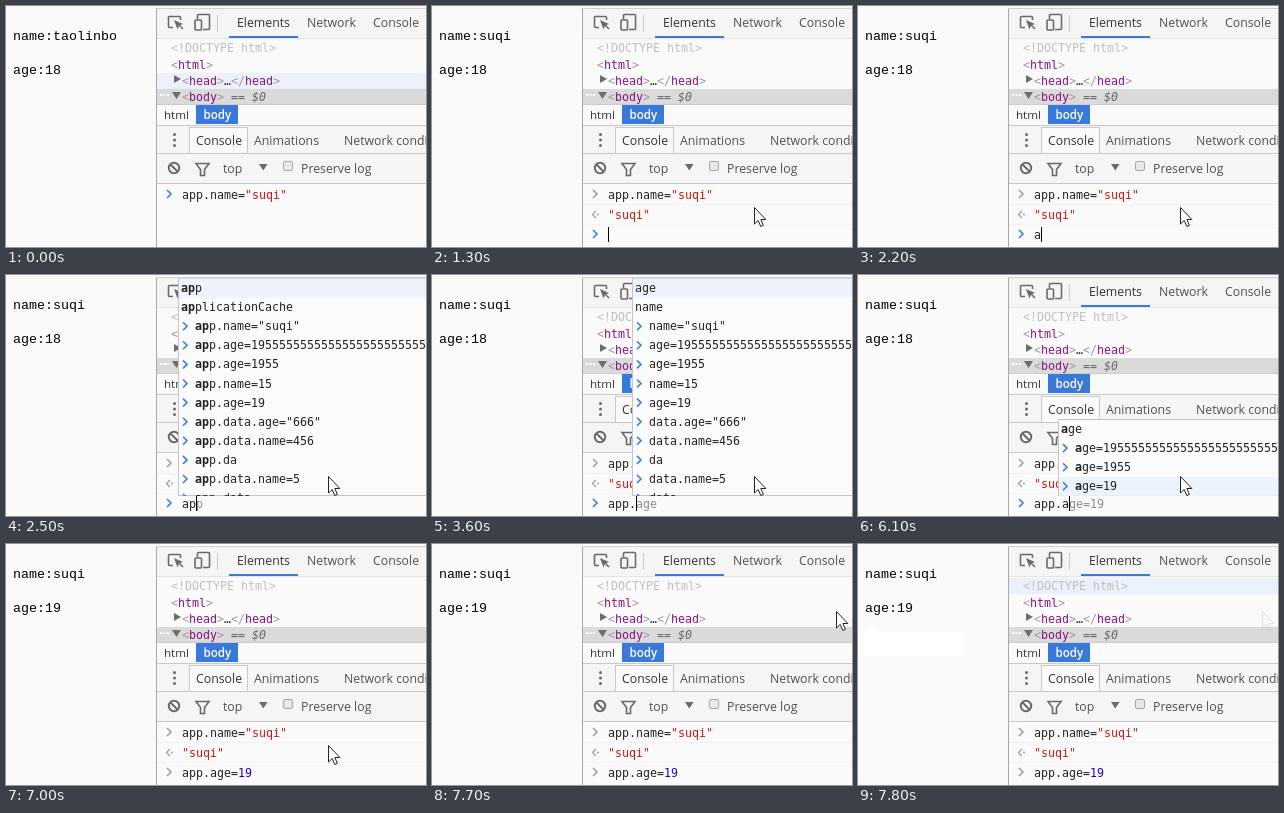
An HTML page for the animation above (8.5 s loop, 420 by 241 pixels).

```html
<!DOCTYPE html>
<html lang="en">
<head>
<meta charset="utf-8">
<title>Console data binding</title>
<style>
  html, body { margin: 0; width: 100%; height: 100%; overflow: hidden; background: #fafafa; }
  svg { display: block; width: 420px; height: 241px; }
  text { white-space: pre; }
  .page { font: 13.33px "Liberation Mono", monospace; fill: #000; }
  .ui { font: 500 12.3px "Open Sans", sans-serif; fill: #505050; }
  .crumb { font: 600 11.6px "Open Sans", sans-serif; fill: #333; }
  .code { font: 11.63px "DejaVu Sans Mono", monospace; fill: #222; }
  .dark { fill: #333; }
  .tag { fill: #881280; }
  .dim { fill: #a894a6; }
  .str { fill: #c41a16; }
  .num { fill: #1c00cf; }
  .ghost { fill: #8c8c8c; }
  .bold { font-weight: bold; }
  .icon { fill: none; stroke: #6a6a6a; stroke-width: 1.6; }
  .solid { fill: #6a6a6a; }
</style>
</head>
<body>
<svg viewBox="0 0 420 241">
  <defs>
    <clipPath id="clip"><rect id="clipBox" x="150" width="270"/></clipPath>
  </defs>
  <rect width="420" height="241" fill="#fafafa"/>
  <g id="tip" fill="#fff"><path d="M5 88l9-9 9 9z"/><rect y="88" width="105" height="24"/></g>
  <text id="name" class="page" x="7" y="34"></text>
  <text id="age" class="page" x="7" y="68"></text>

  <rect x="151" y="3" width="269" height="29" fill="#f5f5f5"/>
  <path d="M150.5 2V241" stroke="#a8a8a8"/>
  <path d="M150 2.5H420" stroke="#d0d0d0"/>
  <path d="M151 32.5H420" stroke="#e4e4e4"/>
  <g class="icon">
    <path d="M167 21.5h-3.5q-1 0-1-1v-9q0-1 1-1h10q1 0 1 1V14"/>
    <path d="M168 14l9 4-4 1.5-1.5 4z" class="solid" stroke="none"/>
    <path d="M173 19l4 4"/>
    <path d="M191.5 13V9.5q0-1 1-1h10q1 0 1 1v13q0 1-1 1H197"/>
    <rect x="189" y="14" width="6.5" height="10" rx="1"/>
  </g>
  <path d="M211.5 9V26" stroke="#ccc"/>
  <g class="ui">
    <text x="231" y="21" class="dark">Elements</text>
    <text x="301" y="21">Network</text>
    <text x="367" y="21">Console</text>
  </g>
  <rect x="223" y="30" width="69" height="2" fill="#3879d9"/>

  <rect id="hover" x="151" width="269" height="16" fill="#ebf1fb"/>
  <rect x="151" y="83" width="269" height="15.5" fill="#dadada"/>
  <g class="code">
    <text x="165" y="46" fill="#c0c0c0" style="fill:#c0c0c0">&lt;!DOCTYPE html&gt;</text>
    <text x="165" y="63" class="dim">&lt;<tspan class="tag">html</tspan>&gt;</text>
    <text x="176" y="79" class="dim">&lt;<tspan class="tag">head</tspan>&gt;<tspan class="dark">…</tspan>&lt;/<tspan class="tag">head</tspan>&gt;</text>
    <text x="176" y="95" class="dim">&lt;<tspan class="tag">body</tspan>&gt;<tspan fill="#666" font-style="italic"> == $0</tspan></text>
  </g>
  <path d="M168 69v8l7-4zM166 86h9l-4.5 7z" fill="#6e6e6e"/>
  <path d="M154 89h2m1.5 0h2m1.5 0h2" stroke="#fff" stroke-width="2"/>

  <path d="M151 98.5H420" stroke="#ccc"/>
  <rect x="190" y="99" width="42" height="19" fill="#3879d9"/>
  <text class="crumb" x="158" y="113" style="font-weight:500">html</text>
  <text class="crumb" x="197.5" y="113" style="fill:#fff">body</text>

  <rect x="151" y="119" width="269" height="59" fill="#f5f5f5"/>
  <path d="M151 119.5H420M151 147.5H420M151 177.5H420" stroke="#c8c8c8"/>
  <rect x="183.5" y="121.5" width="58" height="26" fill="#fafafa" stroke="#c8c8c8"/>
  <g class="solid">
    <circle cx="168.5" cy="128.5" r="1.5"/><circle cx="168.5" cy="134" r="1.5"/><circle cx="168.5" cy="139.5" r="1.5"/>
  </g>
  <g class="ui">
    <text x="190" y="139" class="dark">Console</text>
    <text x="248" y="139">Animations</text>
    <text x="338" y="139">Network conditions</text>
    <text x="217" y="167">top</text>
    <text x="295" y="167">Preserve log</text>
  </g>
  <g class="icon">
    <g stroke-width="2"><circle cx="168" cy="162" r="5.2"/><path d="M164.5 158.5l7 7"/></g>
    <path d="M190 157.5h13l-4.5 6v6h-4v-6z"/>
    <path d="M253 158h8.5l-4.200 6.500z" class="solid" stroke="none"/>
    <rect x="277.5" y="155.5" width="9" height="9" rx="1.500" style="fill:#e8e8e8;stroke:#a8a8a8;stroke-width:1"/>
  </g>

  <g id="log" class="code"></g>
  <g id="popup" class="code"></g>
  <path id="mouse" d="M.5 .5v16.500l3.700-3.500 2.600 6 2.600-1.100-2.600-5.900h5z" fill="#fff" stroke="#222"/>
</svg>
<script>
const $ = id => document.getElementById(id);
const LOOP = 8500, CHAR = 7, ROW = 19.1, BLUE = '#3b7bea', GREY = '#a0a0a0';
const past = ['name="suqi"', 'age=195' + '5'.repeat(28), 'age=1955', 'name=15', 'age=19',
  'data.age="666"', 'data.name=456', 'da', 'data.name=5', 'data'];

const lists = {
  app: { x: 172, y: 3, items: ['app', 'applicationCache'], past: past.map(p => 'app.' + p) },
  member: { x: 200, y: 3, items: ['age', 'name'], past },
  age: { x: 200, y: 144, items: ['age'], past: [past[1], past[2], past[4]] }
};

// pop: open list, sel: its marked row, pre: bold prefix length
const steps = [
  [0, { name: 'taolinbo', age: 18, done: false, input: 'app.name="suqi"', ghost: '', caret: 0,
        pop: '', sel: 0, pre: 0, hover: 67, tip: 0 }],
  [200, { hover: 0 }],
  [500, { caret: 1 }],
  [1000, { caret: 0 }],
  [1200, { name: 'suqi', done: true, input: '' }],
  [1300, { caret: 1 }],
  [1700, { caret: 0 }],
  [2200, { input: 'a', caret: 1 }],
  [2300, { ghost: 'pp', pop: 'app', pre: 1 }],
  [2500, { input: 'ap', ghost: 'p', pre: 2 }],
  [2600, { input: 'app', ghost: '', pre: 3 }],
  [3100, { caret: 0 }],
  [3500, { input: 'app.', pop: '', pre: 0, caret: 1 }],
  [3600, { ghost: 'age', pop: 'member' }],
  [4000, { caret: 0 }],
  [4200, { input: 'app.a', ghost: 'ge', pop: 'age', pre: 1, caret: 1 }],
  [4600, { caret: 0 }],
  [5100, { caret: 1 }],
  [5300, { sel: 1, ghost: past[1].slice(1) }],
  [5400, { sel: 2, ghost: 'ge=1955' }],
  [5600, { caret: 0 }],
  [5800, { sel: 3, ghost: 'ge=19' }],
  [6100, { caret: 1 }],
  [6300, { input: 'app.age=19', ghost: '', pop: '' }],
  [6800, { caret: 0 }],
  [7000, { age: 19, sent: true }],
  [7800, { hover: 34, tip: 1 }]
];

const chevron = (x, y, color) =>
  `<path d="M${x} ${y - 4}l4 4-4 4" fill="none" stroke="${color}" stroke-width="1.6"/>`;
const text = (x, y, body) => `<text x="${x}" y="${y}">${body}</text>`;
const paint = s => s.replace(/"\w+"|=\d+/g, m => m[0] === '='
  ? `=<tspan class="num">${m.slice(1)}</tspan>` : `<tspan class="str">${m}</tspan>`);

function drawLog(s) {
  const y = s.done ? 229 : 189;
  let out = '';
  if (s.done) {
    out += '<path d="M151 198.5H420M151 218.5H420" stroke="#f2f2f2"/>'
      + chevron(161, 188, GREY) + text(176, 193, paint('app.name="suqi"'))
      + `<path d="M164 205l-3.5 3.5 3.5 3.5" fill="none" stroke="${GREY}" stroke-width="1.3"/>`
      + `<circle cx="166" cy="208.5" r="1" fill="${GREY}"/>`
      + text(176, 213, paint('"suqi"'));
  }
  out += chevron(161, y - 1, s.sent ? GREY : BLUE)
    + text(176, y + 4, paint(s.input) + `<tspan class="ghost">${s.ghost}</tspan>`);
  if (s.caret) {
    const x = 176 + s.input.length * CHAR;
    out += `<rect x="${x}" y="${y - 8}" width="1" height="15" fill="#000"/>`;
  }
  return out;
}

function drawPopup(s) {
  const list = lists[s.pop];
  if (!list) return '';
  const { x, y, items, past } = list, h = 221 - y;
  $('clipBox').setAttribute('y', y);
  $('clipBox').setAttribute('height', h);
  const rows = items.concat(past).map((item, i) => {
    const mid = y + 10 + i * ROW, old = i >= items.length;
    const body = `<tspan class="bold">${item.slice(0, s.pre)}</tspan>${item.slice(s.pre)}`;
    return (i === s.sel ? `<rect x="${x + 1}" y="${mid - 9.5}" width="260" height="${ROW}" fill="#edf3fc"/>` : '')
      + (old ? chevron(x + 5, mid, BLUE) : '') + text(x + (old ? 17 : 3), mid + 4, body);
  });
  return `<rect x="${x + .5}" y="${y + .5}" width="260" height="${h - 1}" fill="#fbfbfb" stroke="#c4c4c4"/>`
    + `<g clip-path="url(#clip)">${rows.join('')}</g>`;
}

function moveMouse(t) {
  const tick = Math.floor(t / 100) * 100;
  const p = tick < 7600 ? Math.min(1, Math.max(0, (tick - 100) / 400)) : Math.max(0, (7700 - tick) / 200);
  const k = p * p * (3 - 2 * p);
  const mouse = $('mouse');
  mouse.setAttribute('transform', `translate(${404 - 82 * k} ${67 + 134 * k})`);
  mouse.setAttribute('opacity', tick < 100 ? 0 : tick >= 7800 ? .12 : 1);
}

const start = performance.now();
let last = -1;
function frame() {
  const t = (performance.now() - start) % LOOP;
  const count = steps.filter(([time]) => time <= t).length;
  if (count !== last) {
    last = count;
    const s = Object.assign({}, ...steps.slice(0, count).map(step => step[1]));
    $('name').textContent = 'name:' + s.name;
    $('age').textContent = 'age:' + s.age;
    $('tip').setAttribute('opacity', s.tip);
    $('hover').setAttribute('y', s.hover);
    $('hover').setAttribute('opacity', s.hover ? 1 : 0);
    $('log').innerHTML = drawLog(s);
    $('popup').innerHTML = drawPopup(s);
  }
  moveMouse(t);
  requestAnimationFrame(frame);
}
frame();
</script>
</body>
</html>
```
